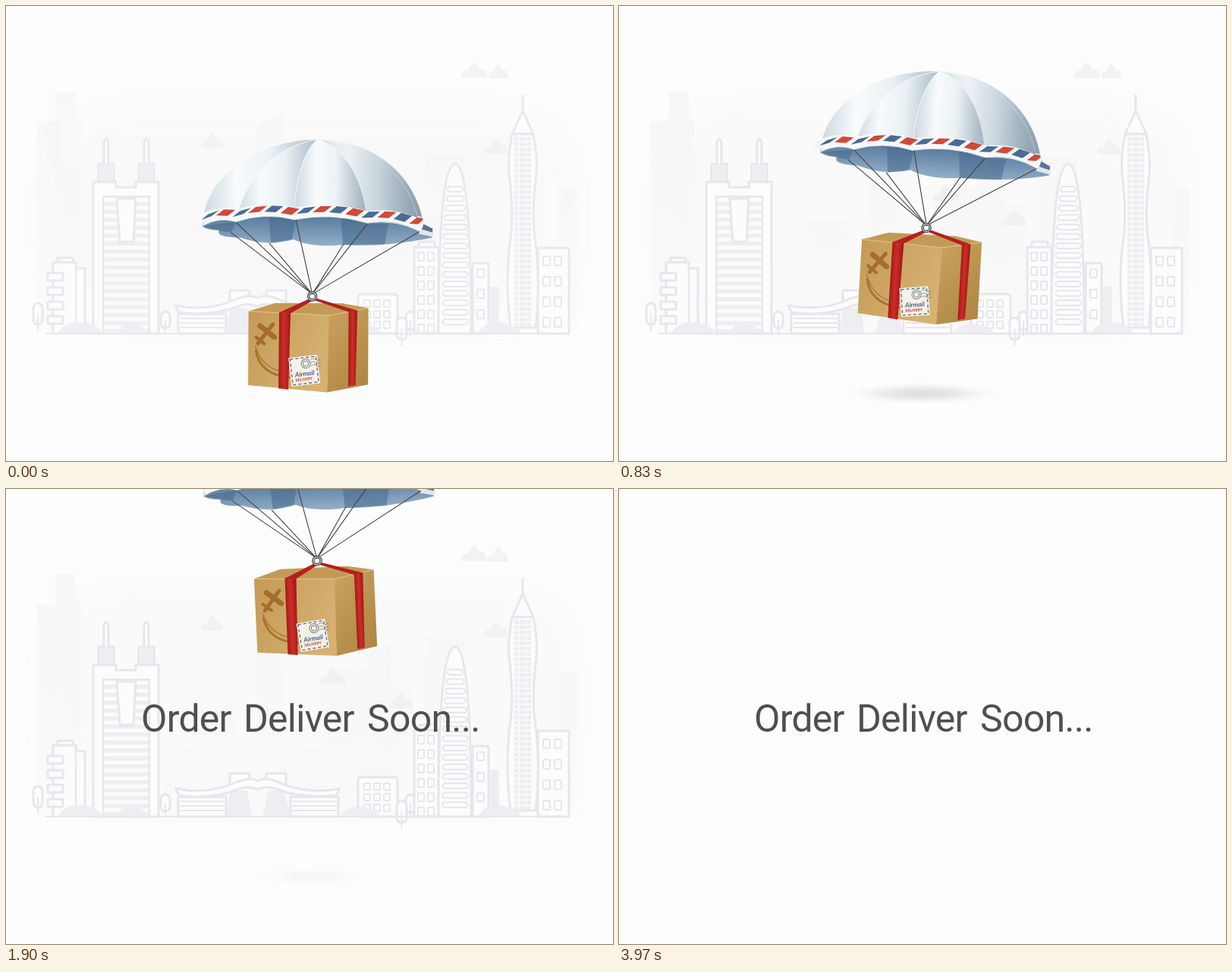
Recreate the animation shown at these times as an HTML page. Size 800 px wide and 600 px high, loop 4010 ms.

```html
<!DOCTYPE html>
<html lang="en">
<head>
<meta charset="utf-8">
<title>Order Deliver Soon</title>
<style>
html, body { margin: 0; width: 100%; height: 100%; overflow: hidden; background: #fdfdfd; }
svg { display: block; width: 100vw; height: 100vh; }
#msg { font: 400 50px Roboto, "Open Sans", sans-serif; letter-spacing: -.75px; fill: #4f4f4f; }
.line { fill: #fcfcfd; stroke: #e6e6ed; stroke-width: 3; stroke-linejoin: round; stroke-linecap: round; }
.thin { fill: none; stroke: #e6e6ed; stroke-width: 2; }
.tone { fill: #eeeef2; }
.pale { fill: #fbfbfc; }
</style>
</head>
<body>
<svg viewBox="0 0 800 600">
  <defs>
    <filter id="soft" x="-20%" y="-20%" width="140%" height="140%"><feGaussianBlur stdDeviation="18"/></filter>
    <radialGradient id="shade">
      <stop offset="0" stop-color="#d3d3d1"/>
      <stop offset=".45" stop-color="#dededc" stop-opacity=".85"/>
      <stop offset="1" stop-color="#f2f2f2" stop-opacity="0"/>
    </radialGradient>
    <linearGradient id="back" x2="0" y2="1">
      <stop offset="0" stop-color="#f7f7f9"/>
      <stop offset="1" stop-color="#f8f8fa" stop-opacity=".5"/>
    </linearGradient>
    <linearGradient id="gore">
      <stop offset="0" stop-color="#cbd8e0"/>
      <stop offset=".3" stop-color="#f8fbfc"/>
      <stop offset=".6" stop-color="#e9f0f3"/>
      <stop offset="1" stop-color="#a9bac6"/>
    </linearGradient>
    <linearGradient id="dusk">
      <stop offset=".6" stop-color="#637d93" stop-opacity="0"/>
      <stop offset="1" stop-color="#637d93" stop-opacity=".5"/>
    </linearGradient>
    <linearGradient id="inner" x2="0" y2="1">
      <stop offset="0" stop-color="#54789b"/>
      <stop offset="1" stop-color="#93aec8"/>
    </linearGradient>
    <linearGradient id="front" x2="1" y2=".5">
      <stop offset="0" stop-color="#c49a56"/>
      <stop offset="1" stop-color="#d6b172"/>
    </linearGradient>
    <linearGradient id="side" x2=".6" y2="1">
      <stop offset="0" stop-color="#caa35f"/>
      <stop offset="1" stop-color="#b18845"/>
    </linearGradient>
    <linearGradient id="strap">
      <stop offset="0" stop-color="#a31a1a"/>
      <stop offset=".45" stop-color="#cf2c28"/>
      <stop offset="1" stop-color="#9c1818"/>
    </linearGradient>
  </defs>

  <g id="city"></g>
  <ellipse id="shadow" rx="112" ry="16" fill="url(#shade)"/>
  <text id="msg" y="320"><tspan x="178">Order</tspan> <tspan x="313">Deliver</tspan> <tspan x="476">Soon...</tspan></text>

  <g id="drop">
    <path fill="url(#inner)" d="M259 291 Q268 297 282 296 Q276 306 310 306 Q345 318 380 308 Q402 319 445 315 Q500 318 563 305 L545 275 270 275Z"/>
    <g fill="#41658a" opacity=".5">
      <path d="M261 291 304 285 298 299 282 297Z"/>
      <path d="M347 276 383 281 378 308 350 313Z"/>
      <path d="M442 276 477 286 505 287 500 314 445 315Z"/>
    </g>
    <path fill="#dfe7ec" d="M544 282 551 284 Q556 291 564 292 L564 304 545 300Z"/>
    <path fill="#55759b" d="M549 287 553 288 563 293 563 298 549 294Z"/>
    <g id="dome"></g>
    <g id="cords" fill="none" stroke="#45423e" stroke-width="1.1"></g>

    <path fill="#c39a55" d="M321 403 356 392 444 392 479 398 427 408Z"/>
    <path fill="url(#front)" d="M321 402.500 427.500 408 425 509.500 321 500.500Z"/>
    <path fill="url(#side)" d="M427 408 479 398 479 499 425 509.500Z"/>
    <path fill="none" stroke="#e2c48a" stroke-width="1" d="M321 403 427 408 479 398"/>

    <g fill="none" stroke="#a9742f" stroke-linecap="round">
      <path stroke-width="3" d="M331 455 Q336 486 375 490"/>
      <path stroke-width="1.200" d="M330 449 Q340 482 376 484"/>
    </g>
    <g transform="translate(344 432) rotate(38)" fill="none" stroke="#a56c2a" stroke-linecap="round">
      <path stroke-width="5" d="M0 -15 V17"/>
      <path stroke-width="7" d="M-12 -3 H12"/>
      <path stroke-width="4" d="M-7 12 H7"/>
    </g>

    <path fill="url(#strap)" d="M361.500 404 376.500 405 374 506 361 504.500Z"/>
    <path fill="url(#strap)" d="M453 403 464.500 401 462.500 500 453 502Z"/>
    <path fill="#b51f1f" d="M361.500 404.500 402 386 408 387 376.500 405.500Z"/>
    <path fill="#b51f1f" d="M453 403.500 404 387 409 385 464.500 401.500Z"/>

    <g transform="translate(395 481) rotate(-7)">
      <rect x="-19" y="-19" width="38" height="38" rx="1" fill="#f5f1e8"/>
      <rect x="-17" y="-17" width="34" height="34" fill="none" stroke="#566a80" stroke-width="1.300" stroke-dasharray="4 3"/>
      <g fill="none" stroke="#7c8388">
        <circle cx="3" cy="-9" r="6"/><circle cx="3" cy="-9" r="3.500"/>
        <path d="M9 -13 q4 -3 7 0 t7 0 M9 -9 q4 -3 7 0 t7 0 M9 -5 q4 -3 7 0 t7 0" stroke-width=".8"/>
      </g>
      <text x="-13" y="7" font-family="Lato, sans-serif" font-size="8.500" font-weight="700" font-style="italic" fill="#3f638a">Airmail</text>
      <text x="-13" y="13" font-family="Roboto, sans-serif" font-size="5" font-weight="700" fill="#cf4038">DELIVERY</text>
    </g>

    <circle cx="405" cy="383" r="5" fill="none" stroke="#4a4a4c" stroke-width="3.600"/>
    <circle cx="405" cy="383" r="5" fill="none" stroke="#b3b5b8" stroke-width="1.500"/>
  </g>
</svg>
<script>
const $ = id => document.getElementById(id);
const path = (d, attrs = 'class="line"') => `<path ${attrs} d="${d}"/>`;
const rect = (x, y, w, h, cls = 'line', r = 1) =>
  `<rect class="${cls}" x="${x}" y="${y}" width="${w}" height="${h}" rx="${r}"/>`;
const rows = (n, fn) => Array.from({ length: n }, (_, i) => fn(i)).join('');
const windows = (xs, y, n, step, w, h) =>
  rows(n, i => xs.map(x => rect(x, y + i * step, w, h, 'thin')).join(''));
const cloud = (x, y, w) =>
  path(`M${x} ${y} q-2 -10 ${w * .25} -10 q${w * .22} -18 ${w * .45} -2 q${w * .28} -2 ${w * .3} 12Z`, 'class="tone" opacity=".7"');
const tree = (x, y, w, h) => rect(x, y, w, h, 'line', w / 2) + path(`M${x + w / 2} ${y + h / 2} V${y + h + 8}`, 'class="thin"');
const mound = (x, w, h) => path(`M${x} 432 q${w * .15} ${-h} ${w * .4} ${-h} q${w * .4} 0 ${w * .6} ${h}Z`, 'class="tone"');

function buildCity() {
  let s = '<rect x="45" y="125" width="710" height="305" rx="90" fill="#f9f9fa" opacity=".75" filter="url(#soft)"/>';
  s += '<g fill="url(#back)">' + path('M40 430 V152 H65 V113 H92 V150 H99 V430Z', '') +
    path('M205 430 V345 H245 V285 H302 V375 H330 V160 L367 138 V345 H392 V430Z', '') +
    path('M392 430 V345 H415 V255 L428 235 H460 V240 H478 V215 L508 206 V262 H535 V430Z', '') +
    path('M553 430 V198 H604 V430Z M728 430 V240 H752 V430Z', '') + '</g>';
  s += cloud(600, 95, 34) + cloud(636, 96, 26) + cloud(258, 187, 28) + cloud(631, 195, 30) +
    cloud(505, 289, 32) + cloud(414, 257, 34);

  // low block on the left
  s += rect(92, 346, 13, 86, 'tone') + rect(68, 332, 20, 6) +
    path('M62 432 V338 H92 V346 H104 V432') + path('M92 346 V432', 'class="thin"') +
    rows(4, i => rect(55, 352 + i * 19, 20, 10)) + tree(36, 392, 12, 28);

  // twin-spire tower
  for (const x of [122, 175])
    s += rect(x, 208, 20, 24, 'line') + rect(x + 2, 210, 16, 20, 'tone') +
      path(`M${x + 7} 208 V180 q3 -10 6 0 V208`);
  s += path('M115 432 V232 H145 V239 H171 V232 H201 V432Z') + rect(128, 251, 61, 181, 'tone', 0) +
    rows(17, i => rect(129, 253 + i * 10.500, 59, 5, 'pale', 2)) +
    path('M128 432 V251 H189 V432', 'class="thin"') +
    path('M146 254 H171 L168 311 H150Z') + tree(204, 403, 12, 22);

  // hall with the winged roof
  s += rect(295, 375, 26, 15) + rect(343, 375, 26, 15) +
    rect(227, 406, 63, 26) + rect(375, 406, 63, 26) +
    rows(3, i => path(`M230 ${412 + i * 6} H288 M378 ${412 + i * 6} H436`, 'class="thin"')) +
    path('M296 398 H318 L324 432 H290Z M346 398 H366 L375 432 H338Z', 'class="tone"') +
    path('M223 395 Q266 403 300 388 Q322 379 331 385 Q342 379 362 388 Q398 403 440 395 L435 404 Q390 408 360 397 Q344 390 331 396 Q318 390 303 397 Q268 410 228 404Z');

  s += rect(464, 380, 52, 52, 'line', 4) + windows([472, 485, 498], 388, 3, 14, 8, 9);
  s += tree(527, 403, 12, 24) + tree(515, 411, 13, 29);

  // right-hand cluster
  s += rect(544, 311, 21, 8) + rect(538, 318, 32, 114) + windows([543, 556], 325, 6, 19, 8, 11) +
    path('M570 432 Q570 208 592 208 Q613 208 613 432Z') +
    rows(15, i => {
      const w = 10 + 6.500 * Math.sin(Math.min(1, i / 7) * Math.PI / 2);
      return rect(592 - w, 238 + i * 12.500, 2 * w, 7, 'thin', 3.500);
    }) +
    rect(615, 339, 21, 93) + windows([621], 347, 3, 27, 9, 11) + rect(638, 370, 12, 62, 'tone');
  s += rect(701, 319, 41, 113) + windows([708, 723], 330, 4, 27, 9, 12);

  // slim tower
  s += path('M681 118 V140 M681 138 L667 169 H695Z') +
    path('M667 169 Q660 205 664 230 Q669 275 665 305 Q657 360 665 424 H698 Q705 360 697 305 Q693 275 698 230 Q702 205 695 169Z') +
    rect(670, 171, 22, 252, 'tone', 0) +
    rows(36, i => path(`M668 ${172 + i * 7} H694`, 'stroke="#fafafc" stroke-width="2"')) +
    path('M676 170 V424 M686 170 V424', 'stroke="#fafafc" stroke-width="1.500"');

  s += mound(68, 62, 15) + mound(146, 42, 14) + mound(440, 55, 13) + mound(622, 58, 15) +
    path('M52 432 H742', 'class="thin"');
  $('city').innerHTML = s;
}

function buildDome() {
  const rim = [[259, 291], [304, 285], [381, 282], [477, 286], [547, 297], [551, 286]];
  const low = ['262 222', '312 235', '380 235', '474 232', '540 236', '540 222'];
  const high = ['335 176', '350 186', '393 190', '448 186', '492 180', '485 176'];
  const sag = [[282, 278], [342, 272], [430, 272], [514, 280], [550, 292]];
  const edge = dy => 'M259 ' + (291 + dy) + sag.map((q, i) =>
    `Q${q[0]} ${q[1] + dy} ${rim[i + 1][0]} ${rim[i + 1][1] + dy}`).join('');
  const whole = `M${rim[0]} C${low[0]} ${high[0]} 411 176 C${high[5]} ${low[5]} ${rim[5]} ` +
    [4, 3, 2, 1, 0].map(i => `Q${sag[i]} ${rim[i]}`).join(' ') + 'Z';
  let s = `<clipPath id="cut"><path d="${whole}"/></clipPath>`;
  sag.forEach((q, i) => {
    s += path(`M${rim[i]} C${low[i]} ${high[i]} 411 176 C${high[i + 1]} ${low[i + 1]} ${rim[i + 1]} Q${q} ${rim[i]}Z`,
      'fill="url(#gore)" stroke="#f6f9fa" stroke-width=".8"');
  });
  s += path(whole, 'fill="url(#dusk)"');
  s += `<g clip-path="url(#cut)">` + path(edge(-8), 'fill="none" stroke="#f7f8f8" stroke-width="15"') +
    '<g id="stripes"></g></g>';
  $('dome').innerHTML = s;

  // slanted bars along the hem
  const guide = document.createElementNS('http://www.w3.org/2000/svg', 'path');
  guide.setAttribute('d', edge(-10));
  const at = d => guide.getPointAtLength(d);
  const length = guide.getTotalLength();
  let bars = '';
  for (let i = 0, d = 4; d < length - 14; i++, d += 21.500) {
    const a = at(d), b = at(Math.min(length, d + 15));
    bars += path(`M${a.x - 5} ${a.y + 4} L${a.x + 5} ${a.y - 4} ${b.x + 5} ${b.y - 4} ${b.x - 5} ${b.y + 4}Z`,
      `fill="${i % 2 ? '#cf4a37' : '#4a6b95'}"`);
  }
  $('stripes').innerHTML = bars;
  $('cords').innerHTML = [[297, 299], [304, 286], [348, 313], [383, 282], [446, 314], [477, 287], [546, 297]]
    .map(p => path(`M${p} L405 380`, '')).join('');
}

function lerp(keys, t) {
  let i = 0;
  while (i < keys.length - 2 && t > keys[i + 1][0]) i++;
  const [a, p] = keys[i], [b, q] = keys[i + 1];
  return p + (q - p) * Math.min(1, Math.max(0, (t - a) / (b - a)));
}

function smooth(keys, t) {
  let i = 0;
  while (i < keys.length - 2 && t > keys[i + 1][0]) i++;
  const slope = k => {
    const a = keys[Math.max(0, k - 1)], b = keys[Math.min(keys.length - 1, k + 1)];
    return (b[1] - a[1]) / (b[0] - a[0]);
  };
  const [a, p] = keys[i], [b, q] = keys[i + 1], h = b - a;
  const u = Math.min(1, (t - a) / h), v = 1 - u;
  return v * v * (1 + 2 * u) * p + u * u * (3 - 2 * u) * q + h * u * v * (v * slope(i) - u * slope(i + 1));
}

const LOOP = 4010;
const rise = [[0, 0], [530, -56], [1130, -129], [1530, -204], [2330, -392], [2900, -540]];
const cityFade = [[0, .9], [350, 1], [2030, 1], [2330, .92], [3130, .38], [3930, 0]];
const textFade = [[1230, 0], [1880, 1]];
const shadowFade = [[0, 0], [200, 1], [530, .95], [1130, .6], [1530, .5], [2130, 0]];
const shadowSize = [[0, 1.200], [530, 1], [1130, .84], [1530, .78], [2130, .7]];

function draw(t) {
  // the tilt and the sideways sway are a quarter turn apart
  const phase = 2 * Math.PI * (t - 830) / 670;
  const tilt = 3.200 * Math.cos(phase);
  const sway = 4.500 + 5.500 * Math.sin(phase);
  $('drop').setAttribute('transform', `translate(${sway} ${smooth(rise, t)}) rotate(${tilt} 411 303)`);
  $('drop').setAttribute('visibility', t < 2900 ? 'visible' : 'hidden');
  $('city').setAttribute('opacity', lerp(cityFade, t));
  $('msg').setAttribute('opacity', lerp(textFade, t));
  $('shadow').setAttribute('opacity', lerp(shadowFade, t));
  $('shadow').setAttribute('transform', `translate(400 511) scale(${lerp(shadowSize, t)})`);
}

buildCity();
buildDome();
const start = performance.now();
function tick() {
  draw((performance.now() - start) % LOOP);
  requestAnimationFrame(tick);
}
tick();
</script>
</body>
</html>
```
